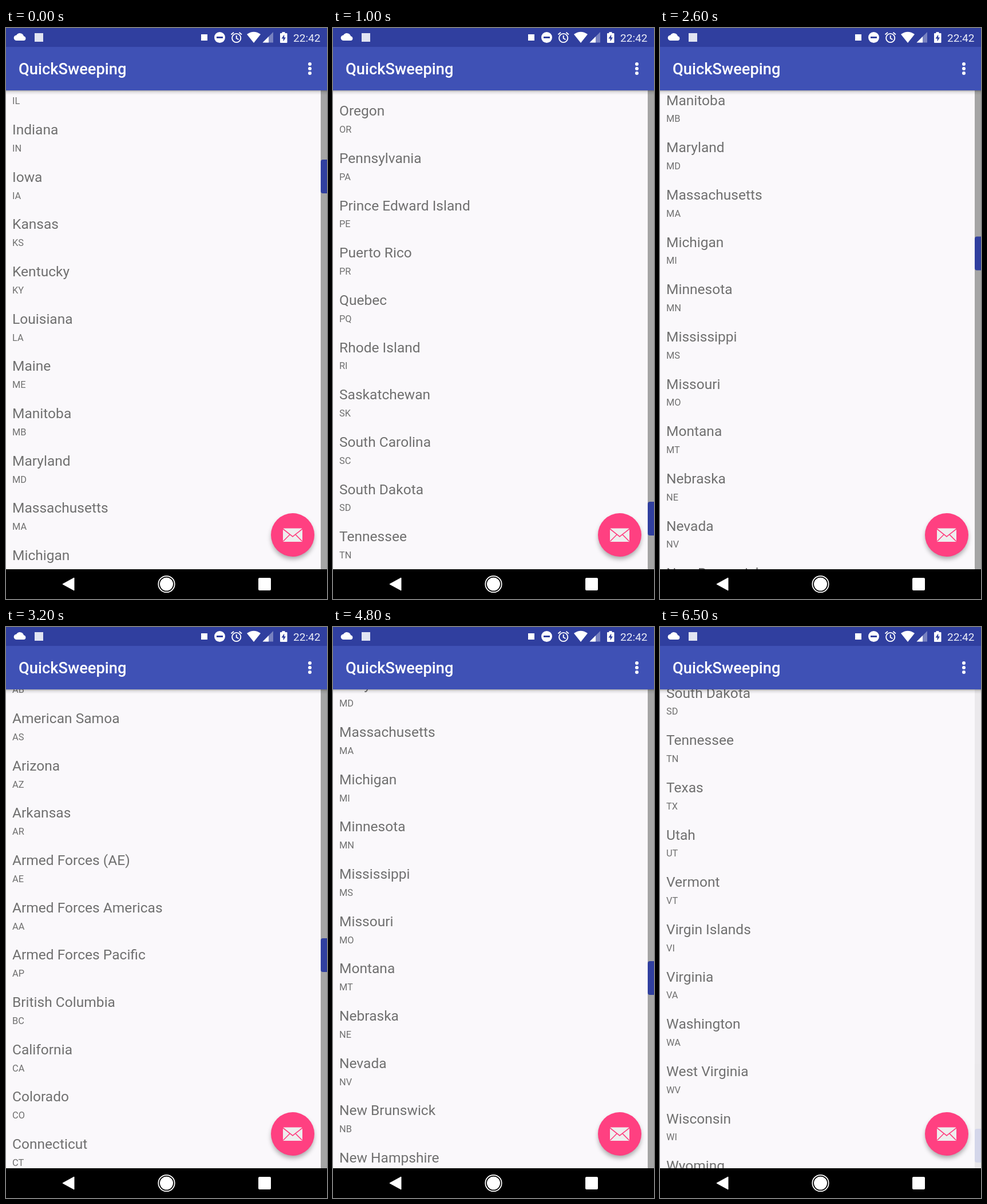
An HTML page that plays this animation: 561 by 998 pixels, repeating every 6.6 s.

```html
<!DOCTYPE html>
<html lang="en">
<head>
<meta charset="utf-8">
<title>List with fast scroll bar</title>
<style>
  html, body { margin: 0; width: 100%; height: 100%; overflow: hidden; background: #faf8fb; }
  svg { display: block; width: 100vw; height: 100vh; font-family: Roboto, sans-serif; }
  #list { fill: #707070; }
  .name { font-size: 24.55px; }
  .code { font-size: 16.37px; }
</style>
</head>
<body>
<svg viewBox="0 0 561 998">
  <defs>
    <linearGradient id="shade" x2="0" y2="1">
      <stop stop-opacity=".32"/>
      <stop offset=".35" stop-opacity=".1"/>
      <stop offset="1" stop-opacity="0"/>
    </linearGradient>
    <filter id="blur" x="-50%" y="-50%" width="200%" height="200%"><feGaussianBlur stdDeviation="4"/></filter>
  </defs>
  <rect width="561" height="998" fill="#faf8fb"/>
  <g id="list"></g>

  <g id="bar">
    <rect x="550" y="109" width="11" height="837" fill="#a5a5a5"/>
    <path id="thumb" d="M561 0H554q-4 0-4 4V55q0 4 4 4H561z" fill="#303f9f"/>
  </g>

  <!-- floating button -->
  <circle cx="501" cy="891" r="37" opacity=".34" filter="url(#blur)"/>
  <circle cx="501" cy="886" r="38" fill="#ff4081"/>
  <rect x="484" y="874.5" width="34" height="23.5" rx="1.5" fill="#eee"/>
  <path d="M484 875.5L501 889L518 875.5M484.500 897L496 885.500M517.500 897L506 885.500" fill="none" stroke="#ff4081" stroke-width="1.6"/>

  <!-- app bar -->
  <rect y="109" width="561" height="8" fill="url(#shade)"/>
  <rect width="561" height="109" fill="#3f51b5"/>
  <rect width="561" height="33" fill="#303f9f"/>
  <g fill="#fff">
    <text x="22" y="81" font-size="27.28" font-weight="500">QuickSweeping</text>
    <circle cx="531" cy="63" r="3"/><circle cx="531" cy="71" r="3"/><circle cx="531" cy="79" r="3"/>
  </g>

  <!-- status bar -->
  <g fill="#fff">
    <path d="M18.500 22a4.700 4.700 0 0 1-.3-9.400a7 7 0 0 1 12.800 1.600a4 4 0 0 1 .5 7.800z"/>
    <rect x="50" y="9" width="15" height="15" fill="#e1e4f2"/>
    <rect x="341" y="11" width="11" height="11"/>
    <circle cx="373.500" cy="16.500" r="9.500"/>
    <rect x="368" y="15" width="11" height="3" fill="#303f9f"/>
    <g fill="none" stroke="#fff" stroke-width="1.900">
      <circle cx="402.700" cy="17.500" r="7.600"/>
      <path d="M402.700 13V18L406.500 20.300M393.500 11.500L398 7.700M412 11.500L407.500 7.700"/>
    </g>
    <path d="M421 11Q433 2.500 445 11L433 26z"/>
    <path d="M448.500 25.500H467V7z" opacity=".35"/>
    <path d="M448.500 25.500H459V15z"/>
    <path d="M482.500 7h5v2h3q1 0 1 1V25q0 1-1 1h-10.500q-1 0-1-1V10q0-1 1-1h2.500z"/>
    <path d="M486.200 11.500L481.500 18.500H484.600V23.500L489 16.500H486.200z" fill="#303f9f"/>
    <text x="502" y="24" font-size="19.1" fill="#eceef8">22:42</text>
  </g>

  <!-- navigation bar -->
  <rect y="946" width="561" height="52"/>
  <g fill="#fff">
    <path d="M99 972L119 961V983z" stroke="#fff" stroke-linejoin="round"/>
    <circle cx="280.500" cy="972" r="11.500"/>
    <circle cx="280.500" cy="972" r="14.200" fill="none" stroke="#fff" stroke-width="1.800"/>
    <rect x="441" y="961" width="22" height="22" rx="2"/>
  </g>
</svg>
<script>
const places = `Alabama AL,Alberta AB,American Samoa AS,Arizona AZ,Arkansas AR,Armed Forces (AE) AE,
Armed Forces Americas AA,Armed Forces Pacific AP,British Columbia BC,California CA,Colorado CO,
Connecticut CT,Delaware DE,District Of Columbia DC,Florida FL,Georgia GA,Guam GU,Hawaii HI,Idaho ID,
Illinois IL,Indiana IN,Iowa IA,Kansas KS,Kentucky KY,Louisiana LA,Maine ME,Manitoba MB,Maryland MD,
Massachusetts MA,Michigan MI,Minnesota MN,Mississippi MS,Missouri MO,Montana MT,Nebraska NE,Nevada NV,
New Brunswick NB,New Hampshire NH,New Jersey NJ,New Mexico NM,New York NY,Newfoundland NF,
North Carolina NC,North Dakota ND,Northwest Territories NT,Nova Scotia NS,Nunavut NU,Ohio OH,
Oklahoma OK,Ontario ON,Oregon OR,Pennsylvania PA,Prince Edward Island PE,Puerto Rico PR,Quebec PQ,
Rhode Island RI,Saskatchewan SK,South Carolina SC,South Dakota SD,Tennessee TN,Texas TX,Utah UT,
Vermont VT,Virgin Islands VI,Virginia VA,Washington WA,West Virginia WV,Wisconsin WI,Wyoming WY`
  .split(',').map(s => s.trim());

const LOOP = 6600, STEP = 100, ROW = 82.67;
const $ = id => document.getElementById(id);

$('list').innerHTML = places.map((place, i) => {
  const y = 140.7 + i * ROW;
  return `<text class="name" x="11" y="${y}">${place.slice(0, -3)}</text>
    <text class="code" x="11" y="${y + 29.9}">${place.slice(-2)}</text>`;
}).join('');

// The thumb is dragged up and down; the list follows slightly later.
const thumbPath = [[0, 230], [200, 115], [1000, 828], [1200, 878], [2000, 122], [2400, 500], [2900, 115],
  [3200, 544], [3500, 860], [4100, 126.5], [4300, 115], [5000, 700], [5600, 174], [5700, 140], [6300, 877]];
const scrollPath = [[0, 1608], [300, 80], [1000, 4121], [1300, 4812], [2000, 82.7], [2500, 2400], [3000, 50],
  [3200, 138], [3600, 4700], [4100, 155], [4400, 50], [5100, 3700], [5600, 814], [5800, 200], [6300, 4812]];

// Smooth curve through the points that never overshoots them.
function follow(path, t) {
  const last = path.length - 1;
  if (t >= path[last][0]) return path[last][1];
  const i = path.findIndex(p => p[0] > t) - 1;
  const rate = k => k < 0 || k >= last ? 0 : (path[k + 1][1] - path[k][1]) / (path[k + 1][0] - path[k][0]);
  const slope = k => {
    const a = rate(k - 1), b = rate(k);
    return a * b > 0 ? 2 * a * b / (a + b) : 0;
  };
  const [t0, y0] = path[i], [t1, y1] = path[i + 1];
  const d = t1 - t0, u = (t - t0) / d, v = 1 - u;
  return v * v * (1 + 2 * u) * y0 + u * u * (3 - 2 * u) * y1 + d * u * v * (v * slope(i) - u * slope(i + 1));
}

const start = performance.now();
function draw() {
  const t = Math.floor((performance.now() - start) % LOOP / STEP) * STEP;
  $('list').setAttribute('transform', `translate(0 ${-follow(scrollPath, t)})`);
  $('thumb').setAttribute('transform', `translate(0 ${follow(thumbPath, t)})`);
  $('bar').setAttribute('opacity', t < 6400 ? 1 : t < 6500 ? 0.6 : 0.18);
  requestAnimationFrame(draw);
}
draw();
</script>
</body>
</html>
```
